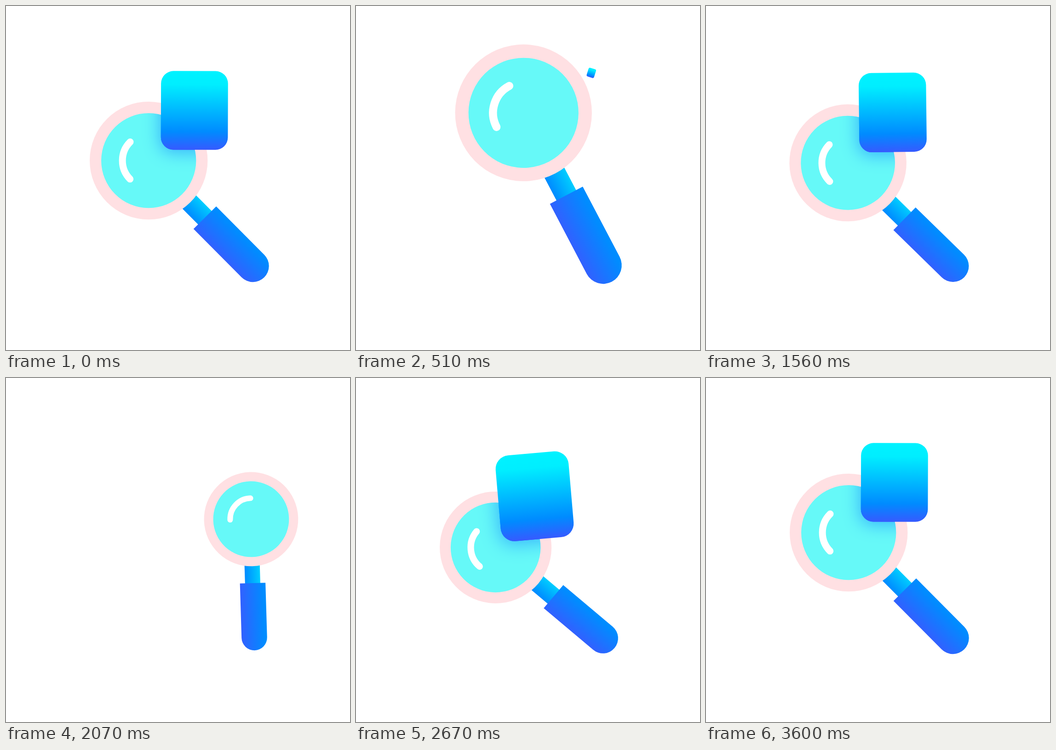
Recreate the animation shown at these times as an HTML page with a canvas. Size 748x748 px, loop 3.63 s.

```html
<!DOCTYPE html>
<html lang="en">
<head>
<meta charset="utf-8">
<title>Search</title>
<style>
html, body { margin: 0; width: 100%; height: 100%; overflow: hidden; background: #fff; }
canvas { display: block; }
</style>
</head>
<body>
<canvas id="stage" width="748" height="748"></canvas>
<script>
const ctx = document.getElementById('stage').getContext('2d');
const TAU = Math.PI * 2;
const STEP = 30, LOOP_STEPS = 121, CYCLE = 60;
const PIVOT = { x: 540.8, y: 568 };
const LENS = { y: -326.5, rim: 128, glass: 103 };
const CARD = { x: 147.2, y: -333.6, w: 145, h: 170.5, r: 27 };

function gradient(x0, y0, x1, y1, ...stops) {
  const g = ctx.createLinearGradient(x0, y0, x1, y1);
  stops.forEach(([at, color]) => g.addColorStop(at, color));
  return g;
}

const handleFill = gradient(-36, 0, 34, 0, [0, '#3260ff'], [0.9, '#008cff'], [1, '#008cff']);
const stemFill = gradient(-22, 0, 20, 0, [0, '#008aff'], [1, '#00cdff']);
const cardFill = gradient(0, -CARD.h / 2, 0, CARD.h / 2,
  [0, '#00f2ff'], [0.17, '#00eeff'], [0.77, '#008bff'], [1, '#365aff']);

// Linear rise from 0 to 1 over ten steps, then a damped swing around 1.
function pop(step) {
  if (step <= 0) return 0;
  const k = step - 10;
  return k <= 0 ? step / 10 : 1 + 0.288 * Math.exp(-0.096 * k) * Math.sin(0.27 * k);
}

function disc(radius, fill) {
  ctx.beginPath();
  ctx.arc(0, LENS.y, radius, 0, TAU);
  ctx.fillStyle = fill;
  ctx.fill();
}

function drawHandle() {
  ctx.fillStyle = stemFill;
  ctx.fillRect(-21.7, -230, 41.5, 85);
  ctx.beginPath();
  ctx.moveTo(-35.6, -152.6);
  ctx.lineTo(33.8, -152.6);
  ctx.arc(-0.9, -4.5, 34.7, 0, Math.PI);
  ctx.closePath();
  ctx.fillStyle = handleFill;
  ctx.fill();
}

function drawLens() {
  disc(LENS.rim, '#ffe0e3');
  disc(LENS.glass, '#66f9f8');
  ctx.beginPath();
  ctx.arc(0, LENS.y, 57, Math.PI, Math.PI * 1.5);
  ctx.strokeStyle = '#fff';
  ctx.lineWidth = 15;
  ctx.lineCap = 'round';
  ctx.stroke();
}

function drawCard(size) {
  ctx.translate(CARD.x, CARD.y);
  ctx.rotate(Math.PI / 4);
  ctx.scale(size, size);
  ctx.beginPath();
  ctx.roundRect(-CARD.w / 2, -CARD.h / 2, CARD.w, CARD.h, CARD.r);
  ctx.fillStyle = cardFill;
  ctx.fill();
}

function draw(n) {
  ctx.clearRect(0, 0, 748, 748);
  const scale = pop(n - 1);
  if (!scale) return;
  const tilt = 1.72 + 43.38 * pop(n - 11);
  const size = pop(n - 16);

  ctx.save();
  ctx.translate(PIVOT.x, PIVOT.y);
  ctx.rotate(-tilt * Math.PI / 180);
  ctx.scale(scale, scale);
  drawHandle();
  drawLens();
  if (size) {
    // The card's shadow falls on the glass only.
    ctx.save();
    ctx.beginPath();
    ctx.arc(0, LENS.y, LENS.glass, 0, TAU);
    ctx.clip();
    ctx.shadowColor = 'rgba(0, 100, 255, 0.45)';
    ctx.shadowBlur = 36 * scale * size;
    ctx.shadowOffsetX = -3 * scale * size;
    ctx.shadowOffsetY = 7 * scale * size;
    drawCard(size);
    ctx.restore();
    drawCard(size);
  }
  ctx.restore();
}

function tick() {
  const step = Math.floor(performance.now() / STEP) % LOOP_STEPS;
  draw(step % CYCLE || CYCLE);
  requestAnimationFrame(tick);
}
tick();
</script>
</body>
</html>
```
